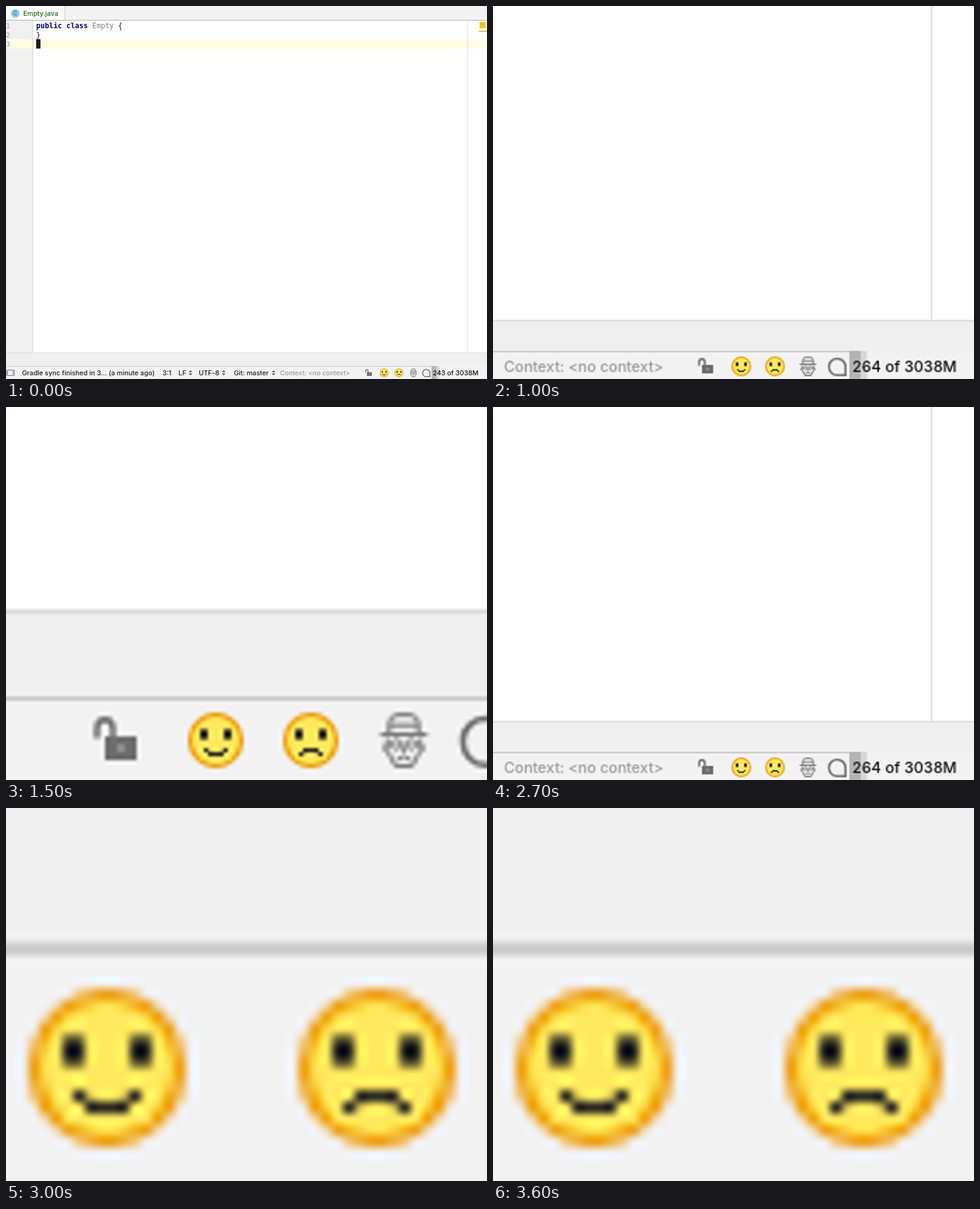
An HTML page with a canvas that plays this animation: 781x605 px, repeating every 5.6 s.

```html
<!DOCTYPE html>
<html lang="en">
<head>
<meta charset="utf-8">
<title>Zoom to status bar</title>
<style>
html, body { margin: 0; width: 100%; height: 100%; overflow: hidden; background: #fff; }
canvas { display: block; }
</style>
</head>
<body>
<canvas id="stage" width="781" height="605"></canvas>
<script>
const W = 781, H = 605, LOOP = 5600;
const UI = '500 10.85px Inter, sans-serif';
const HINT = '500 10.6px Inter, sans-serif';
const CODE = '11.63px "DejaVu Sans Mono", monospace';
const GREY = '#6e6e6e', AMBER = '#f9bc2b', INK = '#2a2924';

const stage = document.getElementById('stage').getContext('2d');
const screen = document.createElement('canvas');
screen.width = W;
screen.height = H;
const g = screen.getContext('2d', { willReadFrequently: true });

function box(x, y, w, h, color) {
  g.fillStyle = color;
  g.fillRect(x, y, w, h);
}

function text(str, x, y, color = '#1c1c1c', font = UI) {
  g.font = font;
  g.fillStyle = color;
  g.fillText(str, x, y);
}

function disc(x, y, r, color) {
  g.fillStyle = color;
  g.beginPath();
  g.arc(x, y, r, 0, 7);
  g.fill();
}

function outline(path, width = 1, color = GREY) {
  g.lineWidth = width;
  g.strokeStyle = color;
  g.stroke(new Path2D(path));
}

function shape(path, color = GREY) {
  g.fillStyle = color;
  g.fill(new Path2D(path));
}

// Pixel-aligned face; mood 1 smiles, -1 frowns.
function face(x, y, mood) {
  disc(x, y, 7, '#ee9900');
  disc(x, y, 5.95, '#fee95c');
  for (const dx of [-4, 2]) {
    box(x + dx, y - 3, 2, 3, 'rgba(28,28,28,.68)');
    box(x + dx, y - 2, 2, 1, '#1c1c1c');
  }
  const ends = mood > 0 ? 2 : 3, middle = 5 - ends;
  box(x - 2, y + middle, 4, 1, INK);
  for (const side of [-1, 1]) {
    box(x - .5 + side * 2.5, y + ends, 1, 1, INK);
    box(x - .5 + side * 1.5, y + ends, 1, 1, 'rgba(42,41,36,.25)');
  }
}

function drawEditor() {
  box(0, 0, W, H, '#fff');
  box(96, 0, W - 96, 22, '#f2f2f2');
  box(95, 0, 1, 23, '#c8c8c8');
  box(0, 22, W, 1, '#dcdcdc');
  box(0, 23, W, 1, '#c4c4c4');
  disc(15, 12, 7, '#86cfe9');
  text('C', 11.9, 15.2, '#31525e', '8.5px Inter, sans-serif');
  text('Empty.java', 28, 16, '#22641f');

  box(0, 24, 43, 538, '#f0f0f0');
  box(0, 54, W, 15, '#fffce3');
  box(43, 24, 1, 538, '#d4d4d4');
  box(749, 24, 1, 538, '#dedede');
  for (let n = 1; n <= 3; n++)
    text(n, 0, 21 + 15 * n, '#999', '11px "DejaVu Sans Mono", monospace');
  text('public class', 49, 36, '#000080', 'bold ' + CODE);
  text('Empty', 140, 36, '#808080', CODE);
  text('{', 182, 36, '#111', CODE);
  text('}', 49, 51, '#111', CODE);
  box(49, 54, 7, 15, '#1c1c1c');
  box(769, 26, 10, 10, AMBER);
  box(767, 40, 14, 2, AMBER);
}

function drawStatusBar(memory) {
  box(0, 562, W, 1, '#dadada');
  box(0, 563, W, 21, '#efefef');
  box(0, 584, 691, 1, '#c8c8c8');
  box(0, 585, W, 20, '#f2f2f2');
  outline('M2.5 590.5h9v9h-9zM.5 590v10M13.5 590v10');

  text('Gradle sync finished in 3... (a minute ago)', 26, 599);
  text('3:1', 254, 599);
  text('LF', 280, 599);
  text('UTF-8', 313, 599);
  text('Git: master', 370, 599);
  text('Context: <no context>', 445, 599, '#999', HINT);
  for (const x of [299.5, 353.5, 434.5])
    shape(`M${x - 3} 594l3 -3 3 3zM${x - 3} 596l3 3 3 -3z`, '#555');

  // Open padlock
  shape('M586 594h8v6h-8z');
  outline('M584 594.5V592a2 2.2 0 0 1 4 0V594.5', 1.4);
  box(589.5, 596, 1, 2, '#aaa');

  face(614, 595, 1);
  face(638, 595, -1);

  // Inspector with hat
  outline('M657.8 593v-2.2q0 -2.2 2.2 -2.2h3q2.2 0 2.2 2.2v2.2M658 591.2h7M655.6 593.5h11.8' +
    'M657.3 594.5v3l2 4h4.4l2 -4v-3M656 597h1M666 597h1M659.6 600q1.9 -1.8 3.8 0', .9);
  outline('M658.5 596a1.2 1.2 0 1 0 2.4 0a1.2 1.2 0 1 0 -2.4 0' +
    'M662.1 596a1.2 1.2 0 1 0 2.4 0a1.2 1.2 0 1 0 -2.4 0M661.5 596.5v1.6', .8);

  outline('M688.2 601.2h-6a5.9 5.9 0 1 1 6 -5.9z', 1.5);
  box(691, 584, 90, 21, '#f2f2f2');
  box(691, 584, 8, 21, '#b4b4b4');
  box(699, 584, 4.5, 21, '#d6d6d6');
  text(memory + ' of 3038M', 693, 599, '#111');
}

function capture(memory) {
  drawEditor();
  drawStatusBar(memory);
  return g.getImageData(0, 0, W, H);
}

// Bicubic (Catmull-Rom) kernel.
function cubic(x) {
  x = Math.abs(x);
  if (x < 1) return 1.5 * x ** 3 - 2.5 * x ** 2 + 1;
  return x < 2 ? -.5 * x ** 3 + 2.5 * x ** 2 - 4 * x + 2 : 0;
}

// Four weighted neighbours for each output position along one axis.
function makeTaps(size, start, length) {
  const first = Math.floor(start), last = Math.ceil(start + length) - 1;
  return Array.from({ length: size }, (_, i) => {
    const pos = start + (i + .5) * length / size - .5, base = Math.floor(pos);
    return [-1, 0, 1, 2].map(d =>
      [Math.min(last, Math.max(first, base + d)), cubic(pos - base - d)]);
  });
}

function enlarge(image, x, y, w, h) {
  const columns = makeTaps(W, x, w), rows = makeTaps(H, y, h);
  const wide = new Float32Array(image.data.length);
  const result = new ImageData(W, H);
  for (let r = Math.floor(y); r < Math.min(H, Math.ceil(y + h)); r++)
    for (let c = 0; c < W; c++)
      for (const [index, weight] of columns[c])
        for (let ch = 0; ch < 4; ch++)
          wide[(r * W + c) * 4 + ch] += weight * image.data[(r * W + index) * 4 + ch];
  for (let r = 0; r < H; r++)
    for (let i = 0; i < W * 4; i++) {
      let value = 0;
      for (const [index, weight] of rows[r]) value += weight * wide[index * W * 4 + i];
      result.data[r * W * 4 + i] = value;
    }
  return result;
}

const full = capture(243);
const later = capture(264);
const near = enlarge(later, 218.6, 169.4, 561.7, 435.3);
const corner = enlarge(later, 437.2, 338.7, 342.5, 265.3);
const icons = enlarge(later, 561, 511, 121.5, 94);
const faces = enlarge(later, 605, 572, 42.8, 33);

// Step in to the faces, then jump back and forth.
const cuts = [
  [0, full], [500, near], [1000, corner], [1500, icons], [2000, faces],
  [2700, corner], [3000, faces], [3300, corner], [3600, faces]
];

let shown;
function tick() {
  const time = performance.now() % LOOP;
  const view = cuts.findLast(([start]) => start <= time)[1];
  if (view !== shown) stage.putImageData(shown = view, 0, 0);
  requestAnimationFrame(tick);
}
tick();
</script>
</body>
</html>
```
